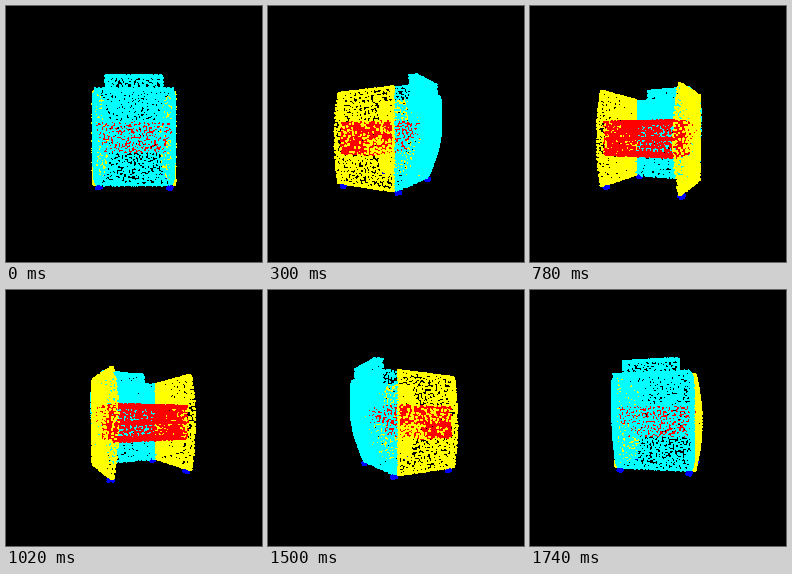
These frames come from a looping animation (256x256 px, 1.8 s). A matplotlib script:

```python
import numpy as np
import matplotlib.pyplot as plt
from matplotlib.animation import FuncAnimation

SIZE, DPI = 256, 100
FRAMES, INTERVAL = 30, 60
FOCAL, DIST = 221.7, 2.584

YELLOW, CYAN, RED, BLUE = (1, 1, 0), (0, 1, 1), (1, 0, 0), (0, 0, 1)

# Cabinet extents: x right, y up, z towards the viewer
Y0, Y1 = -0.54, 0.45
BACK, FRONT = -0.485, 0.22
HALF = 0.428

rng = np.random.default_rng(7)
cloud, tints = [], []


def spread(a, b, density, tries=12):
    """Evenly spaced random points on an a x b rectangle, scaled to 0..1."""
    n = max(4, int(a * b * density))
    pts = np.empty((n, 2))
    pts[0] = rng.random(2) * (a, b)
    for i in range(1, n):
        cand = rng.random((tries, 2)) * (a, b)
        gap = ((cand[:, None] - pts[None, :i]) ** 2).sum(2).min(1)
        pts[i] = cand[gap.argmax()]
    return (pts / (a, b)).T


def add(x, y, z, color):
    pts = np.column_stack(np.broadcast_arrays(x, y, z))
    cloud.append(pts)
    tints.append(np.tile(color, (len(pts), 1)))


def mix(a, b, t):
    return a + (b - a) * t


def plate(lo, hi, color, density):
    """Axis-aligned rectangle; one of the three extents is zero."""
    lo, hi = np.array(lo, float), np.array(hi, float)
    i, j = np.flatnonzero(hi != lo)
    s, t = spread(hi[i] - lo[i], hi[j] - lo[j], density)
    p = np.tile(lo, (len(s), 1))
    p[:, i] = mix(lo[i], hi[i], s)
    p[:, j] = mix(lo[j], hi[j], t)
    add(*p.T, color)


def height(y):
    return (2 * y - Y0 - Y1) / (Y1 - Y0)


def bulge(y, z):
    """Half thickness of a side panel, fattest at the middle of its back."""
    return 0.012 + 0.05 * (1 - height(y) ** 2) * (FRONT - z) / (FRONT - BACK)


def in_drawers(y, z):
    upper = (y > -0.05) & (y < 0.125)
    lower = (y > -0.215) & (y <= -0.05) & (z < -0.07)
    return (upper | lower) & (z > -0.44)


def side_panel(side):
    for layer, density in ((1, 760), (-1, 620)):
        s, t = spread(FRONT - BACK, Y1 - Y0, density)
        z, y = mix(BACK, FRONT, s), mix(Y0, Y1, t)
        keep = ~in_drawers(y, z) | (rng.random(len(y)) < 0.42)
        y, z = y[keep], z[keep]
        add(side * (HALF + layer * bulge(y, z)), y, z, YELLOW)
    for z in (BACK, FRONT):
        s, t = spread(0.07, Y1 - Y0, 1400)
        y = mix(Y0, Y1, t)
        add(side * (HALF + (2 * s - 1) * bulge(y, z)), y, z, YELLOW)
    for y in (Y0, Y1):
        s, t = spread(FRONT - BACK, 0.03, 2600)
        add(side * (HALF + 0.024 * (t - 0.5)), y, mix(BACK, FRONT, s), YELLOW)


def front_shell():
    """Rounded front: superellipse in plan, tapering towards the floor."""
    phi = np.linspace(0, np.pi, 600)
    px = np.sign(np.cos(phi)) * np.abs(np.cos(phi)) ** 0.4
    pz = np.sin(phi) ** 0.4
    arc = np.r_[0, np.cumsum(np.hypot(0.42 * np.diff(px), 0.2 * np.diff(pz)))]
    s, t = spread(arc[-1], Y1 - Y0, 1400)
    y = mix(Y0, Y1, t)
    face = np.interp(y, [Y0, -0.4, -0.2, 0, 0.4, Y1],
                     [0.25, 0.32, 0.4, 0.445, 0.45, 0.41])
    x = np.interp(s * arc[-1], arc, px) * 0.42
    z = mix(FRONT, face, np.interp(s * arc[-1], arc, pz))
    add(x * (1 - 0.07 * np.abs(height(y)) ** 14), y, z, CYAN)
    plate((-0.32, 0.12, 0.33), (0.32, Y1, 0.33), CYAN, 1300)
    plate((-0.39, Y1, 0.3), (0.39, Y1, 0.41), CYAN, 1000)
    plate((-0.39, Y0, 0.2), (0.39, Y0, 0.25), CYAN, 1000)


def lip():
    w, top = 0.28, 0.58
    for z, density in ((0.395, 1100), (0.31, 700)):
        plate((-w, Y1, z), (w, top, z), CYAN, density)
    plate((-w, top, 0.31), (w, top, 0.395), CYAN, 1700)
    for x in (-w, w):
        plate((x, Y1, 0.31), (x, top, 0.395), CYAN, 1700)


def drawers():
    w = 0.385
    for y0, y1, front in ((-0.05, 0.125, 0.2), (-0.215, -0.05, -0.07)):
        for x in (-w - 0.01, w + 0.01):
            plate((x, y0, BACK), (x, y1, front), RED, 1300)
        plate((-w, y0, BACK), (w, y1, BACK), RED, 900)
        plate((-w, y0, front), (w, y1, front), RED, 600)
        plate((-w, y0, BACK), (w, y0, front), RED, 700)
    plate((-w, 0.125, BACK), (w, 0.125, 0.2), RED, 700)


def feet():
    for side in (-1, 1):
        for x, z in ((0.42, -0.42), (0.375, 0.24)):
            a = rng.random(40) * 2 * np.pi
            y = rng.uniform(-0.583, -0.553, 40)
            r = 0.03 * np.sqrt(rng.random(40))
            add(side * x + r * np.cos(a), y, z + r * np.sin(a), BLUE)


for side in (-1, 1):
    side_panel(side)
front_shell()
lip()
drawers()
feet()
cloud, tints = np.vstack(cloud), np.vstack(tints)

fig = plt.figure(figsize=(SIZE / DPI, SIZE / DPI), dpi=DPI, facecolor="black")
ax = fig.add_axes([0, 0, 1, 1])
ax.set(xlim=(0, SIZE), ylim=(SIZE, 0))
ax.axis("off")
dots = ax.scatter(cloud[:, 0], cloud[:, 1], s=(1.7 * 72 / DPI) ** 2,
                  c=tints, linewidths=0, antialiased=False)


def draw(i):
    a = 2 * np.pi * i / FRAMES
    x, y, z = cloud.T
    rx = x * np.cos(a) + z * np.sin(a)
    rz = z * np.cos(a) - x * np.sin(a)
    scale = FOCAL / (DIST - rz)
    order = np.argsort(rz)
    screen = np.column_stack((SIZE / 2 + rx * scale, SIZE / 2 - y * scale))
    dots.set_offsets(screen[order])
    dots.set_facecolors(tints[order])
    return (dots,)


anim = FuncAnimation(fig, draw, frames=FRAMES, interval=INTERVAL,
                     repeat=True, repeat_delay=0)
plt.show()
```
